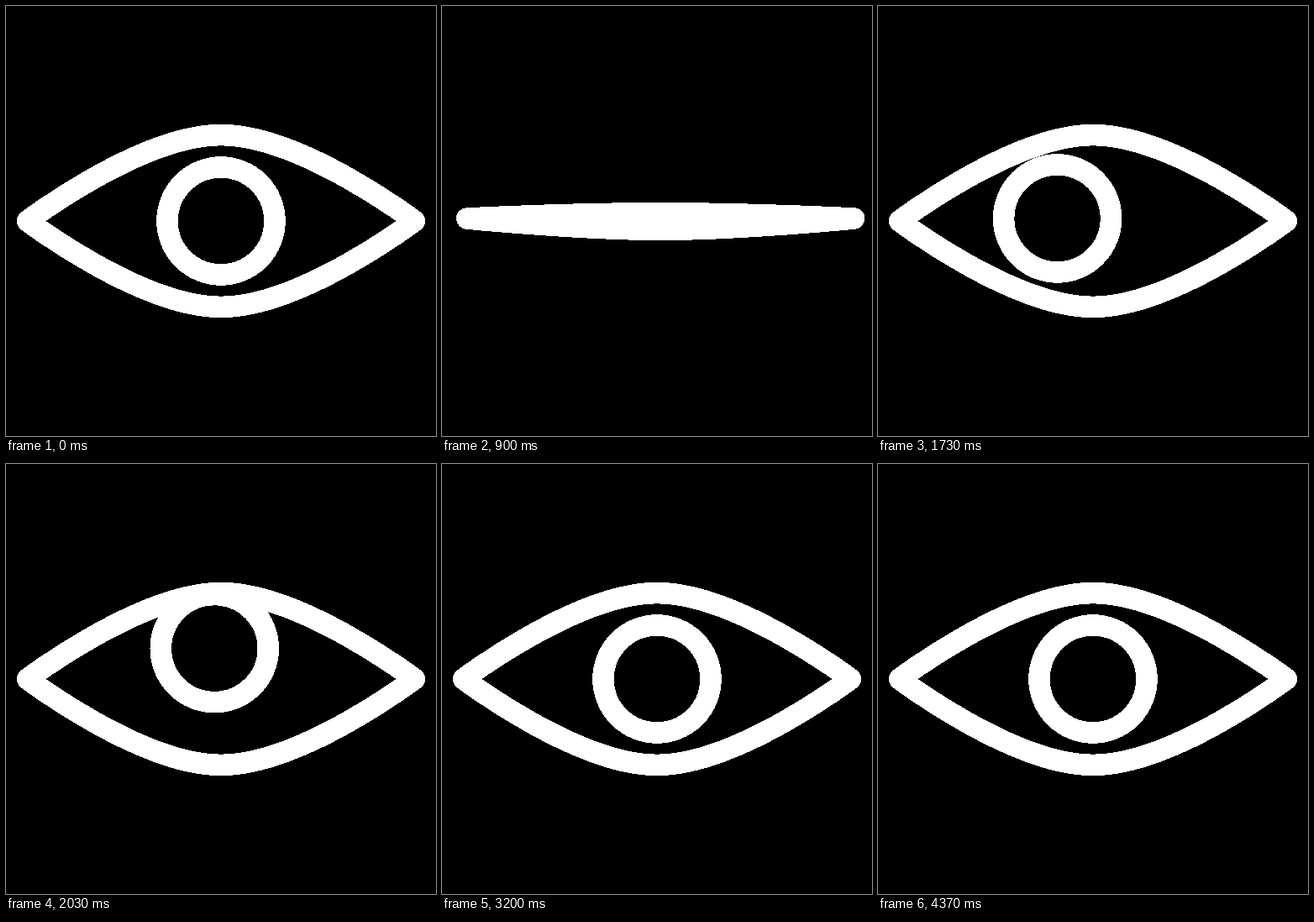
Recreate the animation shown at these times as an HTML page. Size 512 by 512 pixels, loop 5.03 s.

```html
<!DOCTYPE html>
<html lang="en">
<head>
<meta charset="utf-8">
<title>Blinking eye</title>
<style>
  html, body { margin: 0; width: 100%; height: 100%; overflow: hidden; background: #000; }
  svg { display: block; width: 512px; height: 512px; }
  .line { fill: none; stroke: #fff; stroke-width: 25.6px; stroke-linejoin: round; shape-rendering: crispEdges; }
</style>
</head>
<body>
<svg viewBox="0 0 512 512">
  <clipPath id="opening"><path id="openingPath"/></clipPath>
  <g clip-path="url(#opening)"><circle id="pupil" class="line" r="64"/></g>
  <path id="lids" class="line"/>
</svg>
<script>
const byId = id => document.getElementById(id);
const lids = byId('lids'), openingPath = byId('openingPath'), pupil = byId('pupil');

const LOOP = 5030;
const HALF_WIDTH = 230.4;
const BEND = 135;

const OPEN = { x: 256, y: 256, up: 102.4, down: 102.4 };
const SHUT = { x: 260.2, y: 253, up: 6.2, down: 13.3 };
const CENTER = { x: 256, y: 256 };
const LEFT = { x: 212, y: 254.5 };
const UPWARD = { x: 248.3, y: 219.6 };

const glances = [
  { start: 33, end: 367, from: CENTER, to: LEFT },
  { start: 1687, end: 2033, from: LEFT, to: UPWARD },
  { start: 2700, end: 3200, from: UPWARD, to: CENTER }
];
const blinkStarts = [690, 3690];
const CLOSE_TIME = 210;
const REOPEN_TIME = 400;

const clamp = v => Math.min(1, Math.max(0, v));
const progress = (t, start, end) => clamp((t - start) / (end - start));
const smooth = p => p * p * (3 - 2 * p);

// Cubic easing with flat ends; x1 and x2 set how long it lingers at each end.
function ease(p, x1, x2) {
  let lo = 0, hi = 1;
  for (let i = 0; i < 24; i++) {
    const s = (lo + hi) / 2;
    const x = 3 * (1 - s) * (1 - s) * s * x1 + 3 * (1 - s) * s * s * x2 + s * s * s;
    if (x < p) lo = s; else hi = s;
  }
  return smooth((lo + hi) / 2);
}

function mix(a, b, k) {
  const out = {};
  for (const key in a) out[key] = a[key] + (b[key] - a[key]) * k;
  return out;
}

function pupilAt(t) {
  let pos = CENTER;
  for (const g of glances) {
    if (t >= g.start) pos = mix(g.from, g.to, smooth(progress(t, g.start, g.end)));
  }
  return pos;
}

function closureAt(t) {
  let k = 0;
  for (const start of blinkStarts) {
    const shut = start + CLOSE_TIME;
    const closing = smooth(progress(t, start, shut));
    const opening = t > shut ? ease(progress(t, shut, shut + REOPEN_TIME), 0.33, 0.2) : 0;
    k = Math.max(k, closing - opening);
  }
  return k;
}

function lidPath({ x, y, up, down }) {
  const left = x - HALF_WIDTH, right = x + HALF_WIDTH;
  const top = y - up, bottom = y + down;
  return `M${left} ${y}
    C${left} ${y} ${left + BEND} ${top} ${x} ${top}
    S${right} ${y} ${right} ${y}
    S${right - BEND} ${bottom} ${x} ${bottom}
    S${left} ${y} ${left} ${y}Z`;
}

function draw(t) {
  const path = lidPath(mix(OPEN, SHUT, closureAt(t)));
  const { x, y } = pupilAt(t);
  lids.setAttribute('d', path);
  openingPath.setAttribute('d', path);
  pupil.setAttribute('cx', x);
  pupil.setAttribute('cy', y);
}

const began = performance.now();
function tick() {
  draw((performance.now() - began) % LOOP);
  requestAnimationFrame(tick);
}
tick();
</script>
</body>
</html>
```
